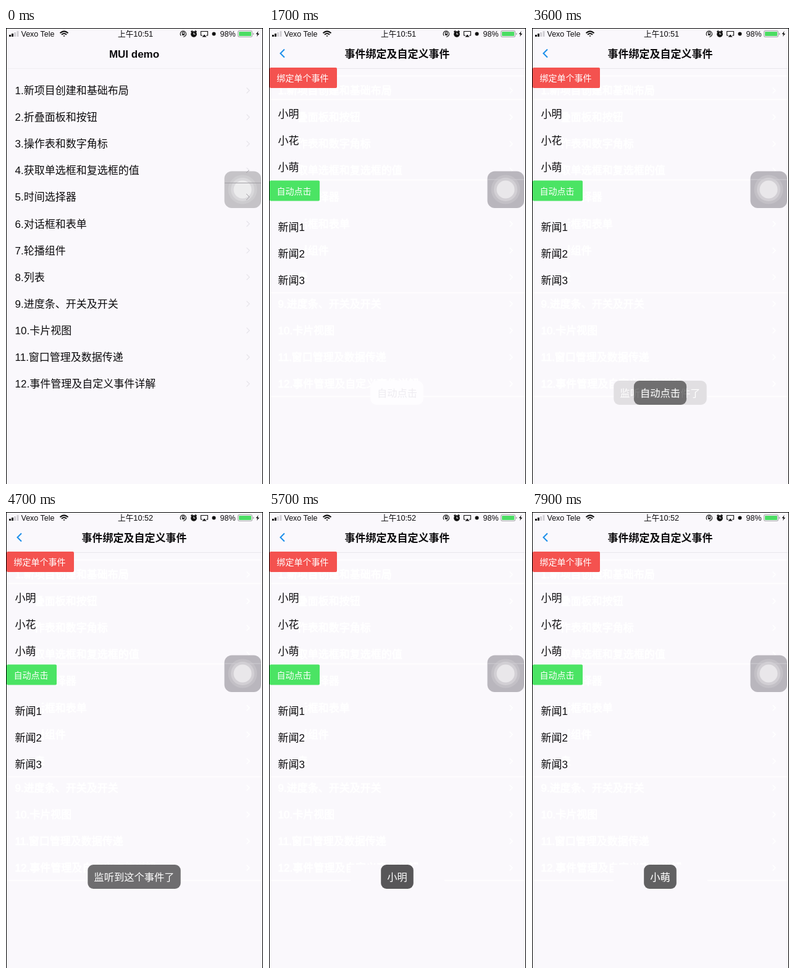
Animation of 416x737 px, one loop 8000 ms. Source, as an HTML page:

```html
<!DOCTYPE html>
<html lang="zh-CN">
<head>
<meta charset="utf-8">
<title>MUI demo</title>
<style>
  html, body { margin: 0; width: 100%; height: 100%; overflow: hidden; background: #faf8fc; }
  svg { display: block; width: 416px; height: 737px; }
  text { font: 17px "Liberation Sans", "Noto Sans CJK SC", "Noto Sans CJK", sans-serif; fill: #0c0b0d; }
  .title { font-weight: 600; text-anchor: middle; }
  .status { font-size: 12.5px; }
  .clock { font-size: 12.7px; font-weight: 500; }
  .button { font-size: 14px; fill: #fff; }
  .toast text, .hint { font-size: 16.3px; text-anchor: middle; fill: #fff; }
  .chevron { fill: none; stroke: #e5e3e9; stroke-width: 1.2; }
  .ghost text { fill: #fff; stroke: #fff; stroke-width: .8; }
  .ghost .chevron, .ghost line { stroke: #fff; stroke-width: 1.5; }
  .pressed { fill: #3c3b3e; }
</style>
</head>
<body>
<svg viewBox="0 0 416 737">
  <rect width="416" height="737" fill="#faf8fc"/>

  <g id="menu">
    <text class="title" x="207.5" y="48">MUI demo</text>
    <path d="M1 65.5H415" stroke="#f0eef3"/>
    <g id="menuRows"></g>
  </g>

  <g id="detail">
    <g class="ghost">
      <g id="ghostRows"></g>
      <g id="ghostLines"></g>
    </g>
    <rect id="cleared" x="132" y="570" width="152" height="40" fill="#faf8fc"/>
    <path d="M1 65.5H415" stroke="#e9e7ec"/>
    <path d="M25 34.5 18.5 41 25 47.5" fill="none" stroke="#1b8eea" stroke-width="2"/>
    <text class="title" x="207.5" y="47.5">事件绑定及自定义事件</text>
    <rect x="1" y="64" width="109" height="33" rx="2" fill="#f4524f"/>
    <text class="button" x="12.5" y="86">绑定单个事件</text>
    <rect x="1" y="246.500" width="81" height="33" rx="2" fill="#4be464"/>
    <text class="button" x="12.5" y="268.500">自动点击</text>
    <g id="detailRows"></g>
    <g id="hint">
      <rect x="164" y="570" width="86" height="39" rx="10" fill="#fefdff"/>
      <text class="hint" x="207.5" y="595.500" style="fill:#eeecf1">自动点击</text>
    </g>
  </g>

  <g id="assist">
    <rect id="assistBox" x="353.500" y="231.500" width="59.500" height="59.500" rx="12"/>
    <circle cx="383" cy="261" r="23.500" fill="#fff" opacity=".14"/>
    <circle cx="383" cy="261" r="19" fill="#fff" opacity=".24"/>
    <circle cx="383" cy="261" r="14.500" fill="#fff" opacity=".5"/>
    <path id="assistMarks" d="M354 250.500H413M389 234 393 230M389 268 394 273 389 278" fill="none" stroke="#a3a1a6"/>
    <path id="assistLine" d="M354 245H413" stroke="#cfcdd2"/>
  </g>

  <g id="toasts"></g>

  <g id="statusBar">
    <g fill="#111">
      <rect x="5" y="11" width="3" height="3"/>
      <rect x="9" y="9" width="3" height="5"/>
      <g fill="#cfcdd2">
        <rect x="13" y="7" width="3" height="7"/>
        <rect x="17.500" y="5" width="3" height="9"/>
      </g>
    </g>
    <text class="status" x="24.500" y="14">Vexo Tele</text>
    <g fill="none" stroke="#111" stroke-width="2">
      <path d="M87.500 8.200Q94 2.600 100.500 8.200M90 10.800Q94 7.300 98 10.800"/>
      <path d="M92.300 12.200 94 14.300 95.700 12.200Z" fill="#111" stroke="none"/>
    </g>
    <text class="clock" id="clock" x="181" y="14">上午10:51</text>
    <g fill="none" stroke="#111" stroke-width="1.1">
      <path d="M283.200 12.500A4.700 4.700 0 1 1 287 14.200M285.300 9.500V8A1.600 1.600 0 0 1 288.700 8V9.500"/>
      <rect x="285" y="9.200" width="4" height="2.600" fill="#111" stroke="none"/>
      <circle cx="304" cy="10" r="4.300" fill="#111"/>
      <path d="M299.500 6.500 302 4.500M308.500 6.500 306 4.500" stroke-width="2"/>
      <path d="M304 7.500V10H306.300" stroke="#fff"/>
      <path d="M318 12H315.500V5.500H326.500V12H324"/>
      <path d="M317.500 14.500 321 10.500 324.500 14.500Z" fill="#111" stroke="none"/>
      <circle cx="336.500" cy="9.500" r="3" fill="#111" stroke="none"/>
      <rect x="375.500" y="4.500" width="23" height="10" rx="2.500" stroke="#a9a7ac"/>
      <rect x="377" y="6" width="20" height="7" rx="1" fill="#4bdc63" stroke="none"/>
      <path d="M400.500 8V11" stroke="#a9a7ac" stroke-width="1.500"/>
      <path d="M408.500 5 404.500 10H407L406 14 410 9H407.500Z" fill="#111" stroke="none"/>
    </g>
    <text class="status" x="346.500" y="14">98%</text>
  </g>

  <path d="M0 .5H416M.5 0V737M415.500 0V737" stroke="#000"/>
</svg>
<script>
const LOOP = 8000, STEP = 100;
const $ = id => document.getElementById(id);

function add(parent, name, attrs, content = '') {
  const node = document.createElementNS('http://www.w3.org/2000/svg', name);
  for (const key in attrs) node.setAttribute(key, attrs[key]);
  node.textContent = content;
  parent.append(node);
  return node;
}

const menu = ['新项目创建和基础布局', '折叠面板和按钮', '操作表和数字角标', '获取单选框和复选框的值',
  '时间选择器', '对话框和表单', '轮播组件', '列表', '进度条、开关及开关', '卡片视图',
  '窗口管理及数据传递', '事件管理及自定义事件详解'];
// Left edge from which each leftover row stays visible.
const ghostStart = [14, 48, 48, 48, 82, 58, 58, 49];

function addRow(parent, label, i) {
  const y = 101 + 43.1 * i;
  add(parent, 'path', { class: 'chevron', d: `M389.5 ${y - 4.5}l4.500 4.500-4.500 4.500` });
  return add(parent, 'text', { x: 14.5, y: y + 6 }, `${i + 1}.${label}`);
}

const menuRows = menu.map((label, i) => addRow($('menuRows'), label, i));
menu.forEach((label, i) => {
  const left = ghostStart[i] || 14;
  addRow($('ghostRows'), label, i).style.clipPath = `inset(-2px -2px -2px ${left - 14}px)`;
});
for (const y of [77.5, 115.5, 245.5, 428, 595.5])
  add($('ghostLines'), 'line', { x1: 1, x2: 415, y1: y, y2: y });

const detailRows = ['小明', '小花', '小萌', '新闻1', '新闻2', '新闻3'].map((label, i) =>
  add($('detailRows'), 'text', { x: 14.5, y: (i < 3 ? 145 : 198) + 43.2 * i }, label));

// Each toast: label, then [time, backdrop darkness] points.
const toasts = [
  ['监听到这个事件了', [[3500, 0], [3600, .1], [3900, .555], [5200, .555], [5500, .31], [5700, 0]]],
  ['自动点击', [[1700, 0], [2100, .63], [3500, .63], [3600, .5], [3900, 0]]],
  ['小明', [[5200, 0], [5500, .35], [5700, .65], [6300, .65], [6700, 0]]],
  ['小花', [[6300, 0], [6800, .66], [7700, .66], [8000, .2]]],
  ['小萌', [[7600, 0], [7900, .4], [8000, .5]]]
].map(([label, points]) => {
  const group = add($('toasts'), 'g', { class: 'toast' });
  const width = label.length * 16.3 + 20;
  const box = add(group, 'rect', { x: 207.5 - width / 2, y: 570, width, height: 39, rx: 9 });
  add(group, 'text', { x: 207.5, y: 595.5 }, label);
  return { group, box, points };
});

function valueAt(points, t) {
  const next = points.findIndex(p => p[0] > t);
  if (next < 0) return points[points.length - 1][1];
  if (next === 0) return points[0][1];
  const [t0, a] = points[next - 1], [t1, b] = points[next];
  return a + (b - a) * (t - t0) / (t1 - t0);
}

const show = (node, on) => node.style.display = on ? '' : 'none';
const press = (node, on) => node.classList.toggle('pressed', on);

function draw(t) {
  const opened = t >= 1600;
  show($('menu'), !opened);
  show($('detail'), opened);
  show($('hint'), t >= 1700 && t < 1800);
  show($('cleared'), t >= 3600);
  $('assistBox').setAttribute('fill', opened ? '#b9b6bd' : '#c5c3c7');
  show($('assistMarks'), !opened);
  show($('assistLine'), opened);
  $('clock').textContent = t < 4700 ? '上午10:51' : '上午10:52';
  press(menuRows[11], t >= 1400);
  press(detailRows[0], t >= 5000 && t < 5300);
  press(detailRows[1], t >= 6300 && t < 6500);
  press(detailRows[2], t >= 7400 && t < 7700);
  for (const { group, box, points } of toasts) {
    const dark = valueAt(points, t);
    show(group, dark > .01);
    box.setAttribute('fill-opacity', dark);
  }
}

function tick() {
  const t = performance.now() % LOOP;
  draw(Math.floor(t / STEP) * STEP);
  requestAnimationFrame(tick);
}
tick();
</script>
</body>
</html>
```
